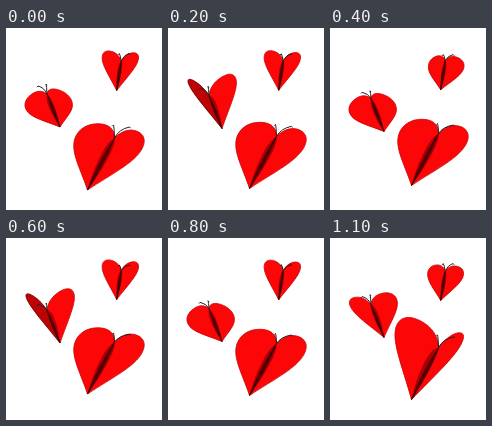
These frames come from a looping animation (156 px wide and 182 px high, 1200 ms). An HTML page with a canvas:

```html
<!DOCTYPE html>
<html lang="en">
<head>
<meta charset="utf-8">
<title>Heart butterflies</title>
<style>
html, body { margin: 0; width: 100%; height: 100%; overflow: hidden; background: #fff }
canvas { display: block }
</style>
</head>
<body>
<canvas id="stage" width="156" height="182"></canvas>
<script>
const ctx = document.getElementById('stage').getContext('2d');
const LOOP = 1200, STEP = 100;

// tail: rest position; axis: tail to head; each wing: mid-stroke vector, then change per unit of lift
const butterflies = [
  { tail: [110.7, 62], axis: [4.5, -29], sway: 0.5, swayAt: 0, period: 600, peak: 100, body: 2,
    left: [-18, -3.5, -1.5, -6.5], right: [18, -1, -1, -6], feelers: [-2, -8, 8, -8] },
  { tail: [54, 102], axis: [-13, -33], sway: 3, swayAt: 600, period: 400, peak: 200, body: 2.4,
    left: [-21.5, 0, 0.5, -13], right: [25, -7, 1, -12], feelers: [-9, -8, -1, -10] },
  { tail: [81.5, 159], axis: [27, -52], sway: 3, swayAt: 0, period: 400, peak: 300, body: 3.2,
    left: [-37, -5, -3, -21], right: [29, 8, -5, -14], feelers: [-1, -13, 15, -11] }
];

const wave = (t, period, peak) => Math.cos(2 * Math.PI * (t - peak) / period);

function drawWing(tail, [ax, ay], wing, lift) {
  const wx = wing[0] + lift * wing[2], wy = wing[1] + lift * wing[3];
  const at = (u, v) => [tail[0] + u * ax + v * wx, tail[1] + u * ay + v * wy];
  const curve = (...p) => ctx.bezierCurveTo(...at(p[0], p[1]), ...at(p[2], p[3]), ...at(p[4], p[5]));

  // half a heart, hinged on the body
  ctx.beginPath();
  ctx.moveTo(...at(1, 0));
  curve(1.12, 0.08, 1.22, 0.25, 1.22, 0.5);
  curve(1.22, 0.8, 1.12, 1, 0.95, 1);
  curve(0.68, 1, 0.4, 0.5, 0, 0);
  ctx.closePath();

  const facing = Math.abs(ax * wy - ay * wx) / (Math.hypot(ax, ay) * Math.hypot(wx, wy));
  const light = Math.max(0, Math.min(1, (facing - 0.45) / 0.27));
  ctx.fillStyle = `rgb(${115 + 137 * light}, ${6 * light}, ${8 * light})`;
  ctx.fill();
  ctx.strokeStyle = light < 1 ? '#700000' : '#c80408';
  ctx.lineWidth = 0.8;
  ctx.stroke();

  // shadow along the fold
  ctx.beginPath();
  ctx.moveTo(...at(0.98, 0));
  curve(0.95, 0.16, 0.45, 0.16, 0, 0);
  ctx.fillStyle = '#a80006';
  ctx.fill();
}

function drawButterfly(b, t) {
  const lift = wave(t, b.period, b.peak);
  const tail = [b.tail[0], b.tail[1] + b.sway * wave(t, LOOP, b.swayAt)];
  const [hx, hy] = [tail[0] + b.axis[0], tail[1] + b.axis[1]];
  drawWing(tail, b.axis, b.left, lift);
  drawWing(tail, b.axis, b.right, lift);

  // tapered body
  const mx = (tail[0] + hx) / 2, my = (tail[1] + hy) / 2;
  ctx.beginPath();
  ctx.moveTo(hx, hy);
  ctx.quadraticCurveTo(mx - b.body, my, ...tail);
  ctx.quadraticCurveTo(mx + b.body, my, hx, hy);
  ctx.fillStyle = '#5a0004';
  ctx.fill();
  ctx.strokeStyle = '#300';
  ctx.lineWidth = 0.7;
  ctx.stroke();

  const reach = 0.85 + 0.15 * wave(t, LOOP, 0);
  ctx.strokeStyle = '#222';
  ctx.lineWidth = 1;
  for (let i = 0; i < 4; i += 2) {
    const dx = b.feelers[i], dy = b.feelers[i + 1] * reach, side = i ? 1 : -1;
    ctx.beginPath();
    ctx.moveTo(hx, hy);
    ctx.quadraticCurveTo(hx + dx * 0.3, hy + dy * 0.8, hx + dx, hy + dy);
    ctx.lineTo(hx + dx + side, hy + dy + 1.2);
    ctx.stroke();
  }
}

function frame(now) {
  const t = Math.floor(now % LOOP / STEP) * STEP;
  ctx.fillStyle = '#fff';
  ctx.fillRect(0, 0, 156, 182);
  butterflies.forEach(b => drawButterfly(b, t));
  requestAnimationFrame(frame);
}
frame(0);
</script>
</body>
</html>
```
